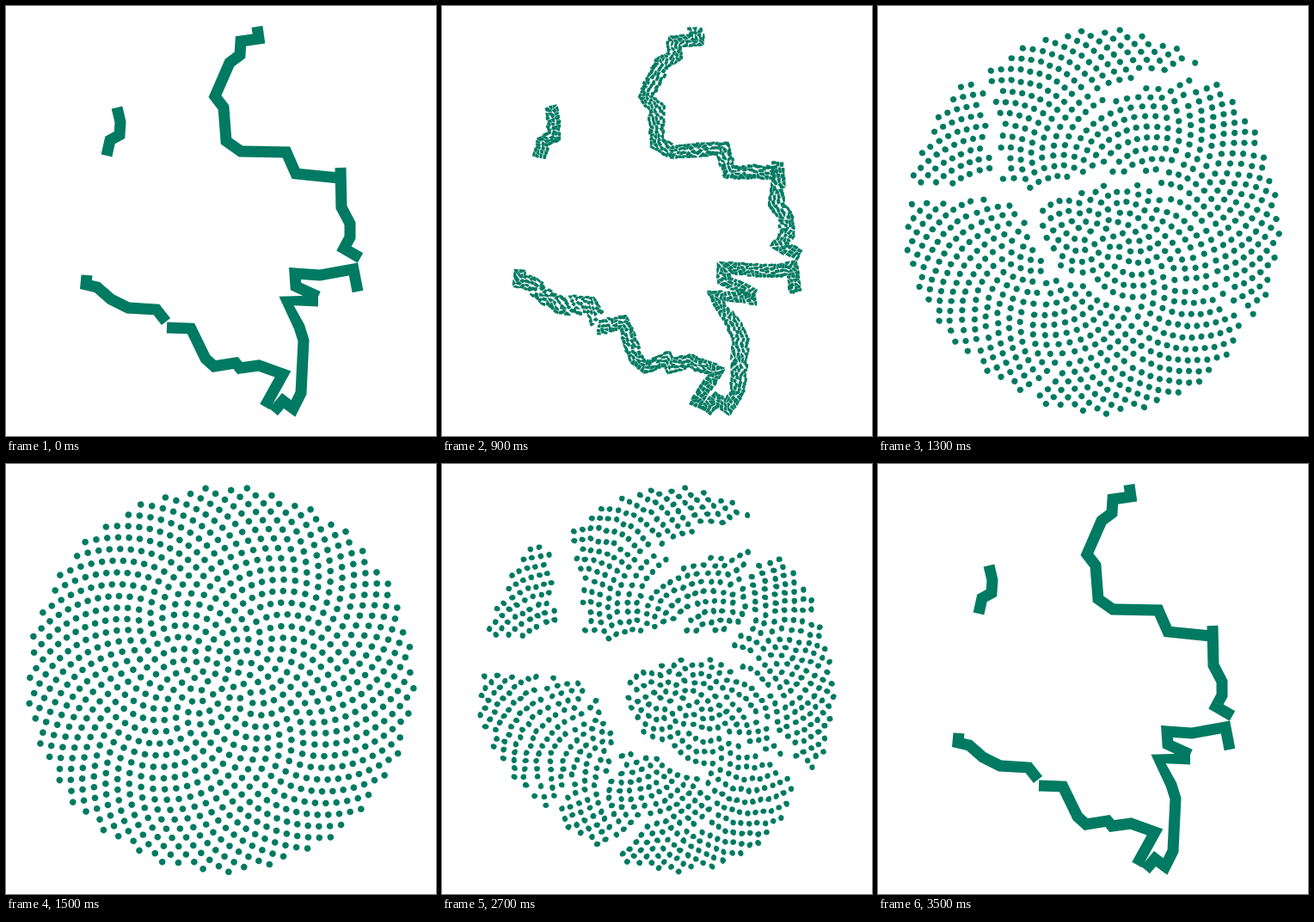
These frames come from a looping animation (500x500 px, 4 s). An HTML page with a canvas:

```html
<!DOCTYPE html>
<html lang="en">
<head>
<meta charset="utf-8">
<title>Coast to sunflower</title>
<style>
  html, body { margin: 0; width: 100%; height: 100%; overflow: hidden; background: #fff; }
  canvas { display: block; width: 500px; height: 500px; }
</style>
</head>
<body>
<canvas id="stage" width="500" height="500"></canvas>
<script>
const ctx = document.getElementById('stage').getContext('2d');
const COLOR = '#007a62';
const COUNT = 937, DOT = 3.8, SPACING = 7.34, SIDES = 16;
const HALF = 6.5, MITER = 1.55;
const LOOP = 4000, STEP = 100;

// Centre lines of the coast, drawn as bands of even width.
const lines = [
  [129,118, 133,135, 132,150, 121,156, 117,174],
  [292,24, 294,38, 273,41, 272,57, 260,66, 243,105, 253,118, 256,157, 273,169, 326,170, 337,195, 387,200],
  [389,188, 390,234, 400,253, 400,269, 393,282, 412,293],
  [409,332, 404,306, 365,313, 336,311, 337,326, 363,338],
  [363,343, 326,343, 341,373, 346,389, 343,450, 334,468, 322,459, 311,472],
  [301,466, 322,428, 294,418, 272,421, 267,415, 242,419, 232,410, 215,375, 187,374],
  [94,313, 93,324, 106,327, 122,341, 142,351, 175,353, 186,367]
];

let seed = 7;
function random() {
  seed = (seed * 16807) % 2147483647;
  return seed / 2147483647;
}

const mix = (a, b, k) => a + (b - a) * k;
const lerp = (p, q, k) => [mix(p[0], q[0], k), mix(p[1], q[1], k)];
const gap = (p, q) => Math.hypot(p[0] - q[0], p[1] - q[1]);

function area(poly) {
  return poly.reduce((sum, p, i) => {
    const q = poly[(i + 1) % poly.length];
    return sum + (p[0] * q[1] - q[0] * p[1]) / 2;
  }, 0);
}

function perimeter(poly) {
  return poly.reduce((sum, p, i) => sum + gap(p, poly[(i + 1) % poly.length]), 0);
}

// Point at a given length along the outline, with the edge it lies on.
function walk(poly, dist) {
  for (let i = 0; i < poly.length; i++) {
    const q = poly[(i + 1) % poly.length], len = gap(poly[i], q);
    if (dist < len) return { edge: i, pt: lerp(poly[i], q, dist / len) };
    dist -= len;
  }
  return { edge: poly.length - 1, pt: poly[0] };
}

// Both banks of a centre line, with capped mitres at the bends.
function banks(line) {
  const pts = [];
  for (let i = 0; i < line.length; i += 2) pts.push([line[i], line[i + 1]]);
  const heading = i => Math.atan2(pts[i + 1][1] - pts[i][1], pts[i + 1][0] - pts[i][0]);
  const last = pts.length - 1;
  return pts.map(([x, y], i) => {
    const a = heading(Math.max(0, i - 1)), b = heading(Math.min(last - 1, i));
    const bend = Math.atan2(Math.sin(b - a), Math.cos(b - a)) / 2;
    const r = HALF * Math.min(MITER, 1 / Math.cos(bend));
    const dx = -Math.sin(a + bend) * r, dy = Math.cos(a + bend) * r;
    return [[x - dx, y - dy], [x + dx, y + dy]];
  });
}

// Cut across the longest edge to the far side of the outline.
function split(poly) {
  let long = 0, best = 0;
  poly.forEach((p, i) => {
    const len = gap(p, poly[(i + 1) % poly.length]);
    if (len > best) { best = len; long = i; }
  });
  const turned = poly.slice(long).concat(poly.slice(0, long));
  const start = lerp(turned[0], turned[1], 0.38 + 0.24 * random());
  const far = walk(turned, gap(turned[0], start) + perimeter(turned) / 2);
  return [
    [start, ...turned.slice(1, far.edge + 1), far.pt],
    [far.pt, ...turned.slice(far.edge + 1), turned[0], start]
  ];
}

function shatter() {
  const pieces = [];
  const add = poly => {
    const size = area(poly);
    if (Math.abs(size) < 0.01) return;
    pieces.push({ poly: size < 0 ? poly.reverse() : poly, size: Math.abs(size) });
  };
  for (const s of bands) {
    for (let i = 1; i < s.length; i++) add([s[i - 1][0], s[i][0], s[i][1], s[i - 1][1]]);
  }
  while (pieces.length < COUNT) {
    let big = 0;
    pieces.forEach((p, i) => { if (p.size > pieces[big].size) big = i; });
    const [cut] = pieces.splice(big, 1);
    split(cut.poly).forEach(add);
  }
  return pieces.map(({ poly }) => {
    const len = perimeter(poly);
    const pts = Array.from({ length: SIDES }, (_, k) => walk(poly, len * k / SIDES).pt);
    const x = pts.reduce((a, p) => a + p[0], 0) / SIDES;
    const y = pts.reduce((a, p) => a + p[1], 0) / SIDES;
    return { x, y, pts, turn: Math.atan2(pts[0][1] - y, pts[0][0] - x) };
  });
}

function sunflower() {
  const golden = Math.PI * (3 - Math.sqrt(5));
  return Array.from({ length: COUNT }, (_, i) => {
    const r = SPACING * Math.sqrt(i + 0.5);
    return { x: 250 + r * Math.cos(i * golden), y: 250 - r * Math.sin(i * golden) };
  });
}

function sortStrips(list) {
  const strip = 31;
  list.sort((a, b) => a.x - b.x);
  const out = [];
  for (let i = 0; i < list.length; i += strip) {
    out.push(...list.slice(i, i + strip).sort((a, b) => a.y - b.y));
  }
  return out;
}

// Swap seats until no pair can shorten its squared travel.
function pair(from, seats) {
  for (let pass = 0, moved = true; moved && pass < 80; pass++) {
    moved = false;
    for (let i = 0; i < COUNT; i++) {
      const a = from[i];
      let s = seats[i];
      for (let j = i + 1; j < COUNT; j++) {
        const b = from[j], t = seats[j];
        if ((a.x - b.x) * (s.x - t.x) + (a.y - b.y) * (s.y - t.y) < -1e-6) {
          seats[j] = s;
          seats[i] = s = t;
          moved = true;
        }
      }
    }
  }
  from.forEach((p, i) => { p.seat = seats[i]; });
}

function clear() {
  ctx.fillStyle = '#fff';
  ctx.fillRect(0, 0, 500, 500);
  ctx.fillStyle = COLOR;
}

function trace(pts) {
  ctx.beginPath();
  pts.forEach(p => ctx.lineTo(p[0], p[1]));
  ctx.closePath();
  ctx.fill();
}

function drawCoast() {
  clear();
  for (const s of bands) trace([...s.map(p => p[0]), ...s.map(p => p[1]).reverse()]);
}

function drawPieces(k) {
  clear();
  for (const { pts, turn, seat } of pieces) {
    trace(pts.map((p, i) => {
      const a = turn + i * 2 * Math.PI / SIDES;
      return lerp(p, [seat.x + DOT * Math.cos(a), seat.y + DOT * Math.sin(a)], k);
    }));
  }
}

// Steps away from the coast: 0 is whole, 11 is the full flower.
function ease(n) {
  if (n >= 11) return 1;
  const x = Math.max(0, (n - 2.6) / 9.25);
  return x < 0.5 ? 4 * x ** 3 : 1 - 4 * (1 - x) ** 3;
}

const bands = lines.map(banks);
drawCoast();
const pieces = sortStrips(shatter());
pair(pieces, sortStrips(sunflower()));

let shown = 0;
function frame() {
  const tick = Math.floor(performance.now() % LOOP / STEP);
  const half = Math.min(tick, LOOP / STEP - 1 - tick);
  const n = Math.max(0, Math.min(11, half - 4));
  if (n !== shown) {
    shown = n;
    if (n) drawPieces(ease(n));
    else drawCoast();
  }
  requestAnimationFrame(frame);
}
requestAnimationFrame(frame);
</script>
</body>
</html>
```
